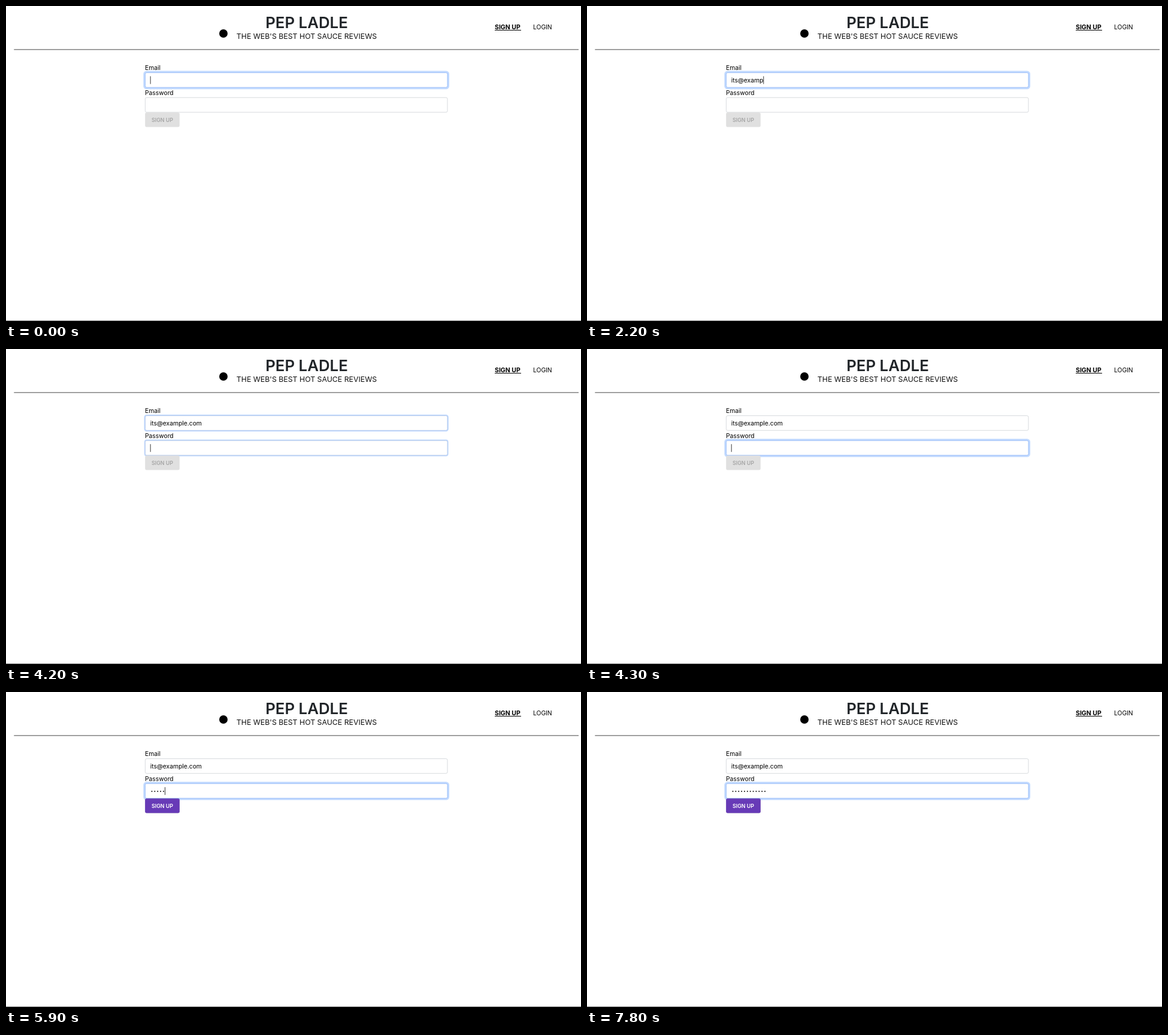
An HTML page for the animation above (8 s loop, 960x527 px).

```html
<!DOCTYPE html>
<html lang="en">
<head>
<meta charset="utf-8">
<title>Sign up</title>
<style>
  html, body { margin: 0; width: 100%; height: 100%; overflow: hidden; background: #fff; }
  svg { display: block; width: 960px; height: 527px; }
  text { font: 10.3px Inter, "Liberation Sans", sans-serif; fill: #000; }
  .title { font-size: 25.8px; font-weight: 600; fill: #212529; text-anchor: middle; }
  .tagline { font-size: 12.3px; fill: #111; text-anchor: middle; }
  .active { font-size: 10.5px; font-weight: 700; }
  .label { font-size: 8.9px; font-weight: 600; text-anchor: middle; }
  .ring { fill: #0d6efd; fill-opacity: .25; }
  .box { fill: #fff; stroke-width: .75; }
</style>
</head>
<body>
<svg viewBox="0 0 960 527">
  <circle cx="363" cy="46" r="7"/>
  <text class="title" x="502" y="37.2">PEP LADLE</text>
  <text class="tagline" x="502" y="55">THE WEB'S BEST HOT SAUCE REVIEWS</text>
  <text class="active" x="816" y="39">SIGN UP</text>
  <rect x="816" y="40" width="44" height="1"/>
  <text x="880" y="39">LOGIN</text>
  <rect x="13.3" y="72.4" width="942.7" height="1" fill="#444"/>
  <rect y="526" width="960" height="1" fill="#888"/>

  <text x="232" y="107">Email</text>
  <text x="232" y="149">Password</text>
  <g id="fields"></g>
  <text id="email" x="240.7" y="128"></text>
  <path id="dots" stroke="#111" stroke-width="2.1" stroke-linecap="round" stroke-dasharray="0 4.87"/>
  <rect id="caret" width=".9" height="13" fill="#222"/>
  <rect id="button" x="232.2" y="178.3" width="57.6" height="24.2" rx="2.67"/>
  <text id="label" class="label" x="261" y="193.5">SIGN UP</text>
</svg>
<script>
const LOOP = 8000, TICK = 100;
const ADDRESS = "its@example.com";
const emailKeys = [500, 600, 700, 900, 1100, 1600, 2000, 2100, 2200, 2400, 2600, 3200, 3600, 3700, 3900];
const passwordKeys = [5000, 5200, 5300, 5600, 5900, 6000, 6200, 6400, 6700, 6900, 7100, 7300];
const SWITCH = 4200;
const allKeys = [-200, ...emailKeys, SWITCH, ...passwordKeys];

const $ = id => document.getElementById(id);
const set = (el, attrs) => { for (const k in attrs) el.setAttribute(k, attrs[k]); };
const progress = (t, start, length) => Math.min(1, Math.max(0, (t - start) / length));
const mix = (a, b, p) => `rgb(${a.map((v, i) => Math.round(v + (b[i] - v) * p))})`;

function makeField(y) {
  const [ring, box] = ["ring", "box"].map(name => {
    const rect = document.createElementNS("http://www.w3.org/2000/svg", "rect");
    rect.setAttribute("class", name);
    return $("fields").appendChild(rect);
  });
  set(box, { x: 232.4, y: y + .4, width: 504.6, height: 24.6, rx: 2.4 });
  return focus => {
    const spread = 2.67 * focus;
    set(ring, {
      x: 232 - spread, y: y - spread, rx: 2.67 + spread,
      width: 505.4 + 2 * spread, height: 25.4 + 2 * spread,
      visibility: focus ? "visible" : "hidden"
    });
    set(box, { stroke: mix([202, 206, 210], [134, 175, 246], focus) });
  };
}
const focusEmail = makeField(111.2), focusPassword = makeField(152.8);

function draw(t) {
  const typed = keys => keys.filter(k => k <= t).length;

  const f = progress(t, 4130, 150), shift = f * f * (3 - 2 * f);
  focusEmail(1 - shift);
  focusPassword(shift);

  const email = $("email"), letters = typed(emailKeys), dots = typed(passwordKeys);
  email.textContent = ADDRESS.slice(0, letters);
  set($("dots"), { d: dots ? `M243.5 166.2h${4.87 * (dots - .5)}` : "" });

  const inPassword = t >= SWITCH;
  const advance = inPassword ? 4.87 * dots : letters ? email.getComputedTextLength() : 0;
  const lastKey = allKeys[typed(allKeys) - 1];
  set($("caret"), {
    x: 240.7 + advance, y: inPassword ? 159.2 : 117.5,
    visibility: (t - lastKey) % 1000 < 500 ? "visible" : "hidden"
  });

  const on = 1 - (1 - progress(t, 4920, 400)) ** 3;
  set($("button"), { fill: mix([224, 224, 224], [103, 58, 183], on) });
  $("button").style.filter = on ? `drop-shadow(0 .8px .7px rgba(0,0,0,${.3 * on}))` : "none";
  set($("label"), { style: `fill:${on ? "#fff" : "#a6a6a6"}` });
}

function frame() {
  draw(Math.floor(performance.now() % LOOP / TICK) * TICK);
  requestAnimationFrame(frame);
}
frame();
</script>
</body>
</html>
```
